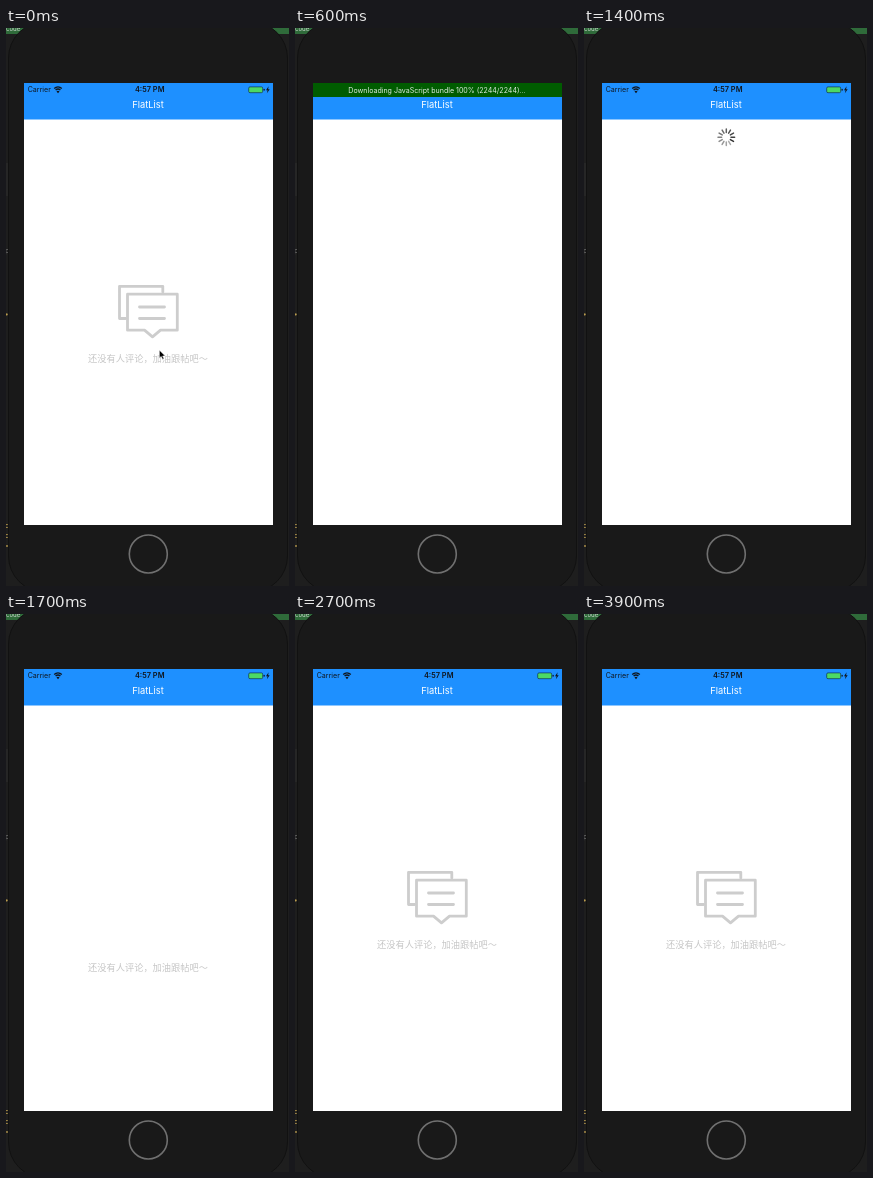
These frames come from a looping animation (283x558 px, 4000 ms). An HTML page:

```html
<!DOCTYPE html>
<html lang="zh-CN">
<head>
<meta charset="utf-8">
<title>FlatList</title>
<style>
  html, body { margin: 0; width: 100%; height: 100%; overflow: hidden; background: #1e1e1e; }
  svg { display: block; width: 283px; height: 558px; }
  text { font-family: Inter, "Open Sans", sans-serif; }
  .mid { text-anchor: middle; }
  .code { font: 7px "Noto Sans Mono", monospace; }
  #label { font: 9.23px "Noto Sans CJK SC", "Noto Sans CJK", sans-serif; fill: #c6c6c6; }
</style>
</head>
<body>
<svg viewBox="0 0 283 558">
  <defs><clipPath id="screen"><rect x="18" y="55" width="249" height="442"/></clipPath></defs>

  <!-- desktop behind the phone -->
  <rect width="283" height="558" fill="#1e1e1e"/>
  <rect width="283" height="6" fill="#2f6b3a"/>
  <rect y="135" width="3" height="33" fill="#262626"/>
  <g class="code">
    <text x="0" y="3" font-size="6" fill="#c9d6cb">code</text>
    <text x="-1" y="225" fill="#777">p</text>
    <text x="-2" y="395" fill="#777">)</text>
    <g fill="#d0ae55">
      <text x="-1" y="291">*</text>
      <text x="-1" y="500">d</text>
      <text x="-1" y="510">d</text>
      <text x="-1" y="520">=</text>
    </g>
  </g>

  <!-- phone -->
  <rect x="2.5" y="-6" width="279" height="570" rx="36" fill="#191919" stroke="#111"/>
  <circle cx="142.3" cy="526" r="19" fill="#191919" stroke="#707070" stroke-width="1.6"/>

  <g clip-path="url(#screen)">
    <rect x="18" y="55" width="249" height="442" fill="#fff"/>
    <g id="header">
      <rect x="18" y="55" width="249" height="36.5" fill="#1e90ff"/>
      <text class="mid" x="142" y="79.8" font-size="9.3" fill="#fff">FlatList</text>
      <g fill="#10151c">
        <text x="21.7" y="64.4" font-size="7.1">Carrier</text>
        <text class="mid" x="143.7" y="64.4" font-size="7.4" font-weight="600">4:57 PM</text>
        <path d="M52 65.2l-1.5-1.8a2.3 2.3 0 0 1 3 0z"/>
        <path d="M49.6 62.1a3.6 3.6 0 0 1 4.8 0M48.2 60.4a5.7 5.7 0 0 1 7.6 0" fill="none" stroke="#10151c" stroke-width="1.3"/>
        <rect x="242.7" y="58.9" width="14" height="5.8" rx="1.3" fill="#4cd964" stroke="#10304f" stroke-width=".7"/>
        <rect x="257.6" y="60.8" width="1" height="2" rx=".5"/>
        <path d="M262.6 58.3l-2.6 3.9h1.6l-.7 3 2.8-4h-1.6z"/>
      </g>
    </g>
    <g id="spinner" stroke="#333" stroke-width="1.5" stroke-linecap="round"></g>
    <g id="icon" fill="none" stroke="#cdcdcd" stroke-width="2.8" stroke-linejoin="round" stroke-linecap="round">
      <path d="M119.5 290.5H113.5V258.3H156.8V264"/>
      <path d="M121.5 266.2H171.3V302.2H154.5L146.5 308.8L138.5 302.2H121.5Z"/>
      <path d="M133.5 279H158.5M133.5 290.5H158.5"/>
    </g>
    <text id="label" class="mid" x="142" y="333.5">还没有人评论，加油跟帖吧～</text>
    <g id="banner">
      <rect x="18" y="55" width="249" height="14" fill="#005c00"/>
      <text class="mid" x="142" y="64.6" font-size="7.05" fill="#e4efe4">Downloading JavaScript bundle 100% (2244/2244)...</text>
    </g>
  </g>
  <path id="cursor" d="M0 0V8.2L1.9 6.5L3.3 9.4L4.7 8.8L3.4 6H6Z" fill="#000" stroke="#fff" stroke-width=".6"/>
</svg>
<script>
const LOOP = 4000, TICK = 100, SPOKES = 12;
const $ = id => document.getElementById(id);
const show = (id, on) => $(id).setAttribute('visibility', on ? 'visible' : 'hidden');
const move = (id, x, y) => $(id).setAttribute('transform', `translate(${x} ${y})`);

const spokes = Array.from({ length: SPOKES }, (_, i) => {
  const line = document.createElementNS('http://www.w3.org/2000/svg', 'path');
  line.setAttribute('d', 'M0 -4.7V-8.3');
  line.setAttribute('transform', `translate(142.3 109.3) rotate(${i * 360 / SPOKES})`);
  $('spinner').append(line);
  return line;
});

// Banner offset while it slides away
const slide = t => t < 900 ? 0 : t < 1000 ? -4 : t < 1100 ? -11 : -14;

function draw(t) {
  const before = t < 200, loaded = t >= 1700;
  show('header', before || t >= 500);
  show('banner', t >= 200 && t < 1100);
  move('banner', 0, slide(t));

  show('spinner', t >= 700 && !loaded);
  const head = Math.floor(t / 1000 * SPOKES);
  spokes.forEach((s, i) => {
    const age = ((head - i) % SPOKES + SPOKES) % SPOKES;
    s.setAttribute('opacity', 1 - 0.6 * age / (SPOKES - 1));
  });

  const hasIcon = before || t >= 1800;
  show('icon', hasIcon);
  show('label', before || loaded);
  move('label', 0, hasIcon ? 0 : 23);

  show('cursor', t < 500);
  const k = Math.min(t / 300, 1);
  move('cursor', 153.3 + 29 * k, 322 + 12.7 * k);
}

const start = performance.now();
function frame() {
  const t = (performance.now() - start) % LOOP;
  draw(Math.floor(t / TICK) * TICK);
  requestAnimationFrame(frame);
}
frame();
</script>
</body>
</html>
```
